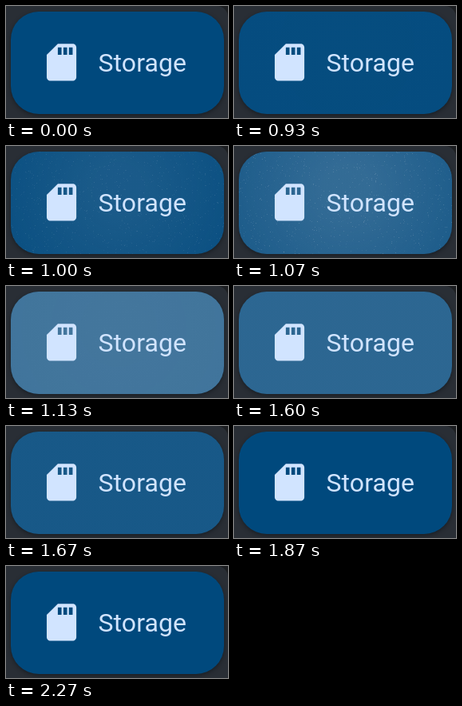
Recreate the animation shown at these times as an HTML page with a canvas. Size 278 by 140 pixels, loop 2.39 s.

```html
<!DOCTYPE html>
<html lang="en">
<head>
<meta charset="utf-8">
<title>Storage button</title>
<style>
  html, body { margin: 0; width: 100%; height: 100%; overflow: hidden; background: #1c1e21; }
  .panel { position: absolute; inset: 0; background: #292e35; border-top-right-radius: 14px; }
  .card {
    position: absolute; left: 6px; top: 7px; width: 266.5px; height: 127.6px;
    border-radius: 35px; overflow: hidden; background: #00497d;
    box-shadow: 0 2px 5px rgba(12, 15, 20, .5);
  }
  canvas { display: block; }
  svg { position: absolute; left: 0; top: 0; fill: #d1e4ff; }
  text { font: 400 32px Roboto, sans-serif; letter-spacing: .1px; }
</style>
</head>
<body>
<div class="panel"></div>
<div class="card"><canvas width="267" height="128"></canvas></div>
<svg width="278" height="140" viewBox="0 0 278 140">
  <path transform="translate(41.7 42.5) scale(2.32)" fill-rule="evenodd"
    d="M18 2h-8L4 8v12c0 1.1.9 2 2 2h12c1.1 0 2-.9 2-2V4c0-1.1-.9-2-2-2zM12 8h-2V4h2zM15 8h-2V4h2zM18 8h-2V4h2z"/>
  <text x="115.5" y="81.8">Storage</text>
</svg>
<script>
  const LOOP = 2390, FRAME = 1000 / 15, PEAK = .325;
  const canvas = document.querySelector('canvas');
  const ctx = canvas.getContext('2d');
  const { width: W, height: H } = canvas;
  const tint = a => `rgba(209,215,225,${a})`;

  function smooth(x) {
    x = Math.min(1, Math.max(0, x));
    return x * x * (3 - 2 * x);
  }

  function seeded(seed) {
    return () => (seed = (seed * 16807) % 2147483647) / 2147483647;
  }

  function sparkle(strength, seed) {
    const rnd = seeded(seed);
    for (let i = 0; i < 1500; i++) {
      const x = Math.floor(rnd() * W), y = Math.floor(rnd() * H);
      ctx.fillStyle = tint(strength * .2 * rnd() ** 2);
      ctx.fillRect(x, y, 1, 1);
    }
  }

  function draw(n) {
    const rise = smooth((n - 13.3) / 4);
    const fall = smooth((n - 22) / 5);
    const spread = 4 * rise * rise * (1 - rise);   // ripple front crossing the card
    const level = PEAK * (rise - fall);

    ctx.clearRect(0, 0, W, H);
    const glow = ctx.createRadialGradient(135, 46, 30, 135, 46, 140);
    glow.addColorStop(0, tint(level));
    glow.addColorStop(1, tint(level - .18 * spread));
    ctx.fillStyle = glow;
    ctx.fillRect(0, 0, W, H);
    if (spread > 0) sparkle(1.8 * spread, 7919 * n);
  }

  let shown = -1;
  function tick() {
    const t = performance.now() % LOOP;
    const n = Math.floor((t + 4) / FRAME);   // the picture steps at 15 fps
    if (n !== shown) draw(shown = n);
    requestAnimationFrame(tick);
  }
  tick();
</script>
</body>
</html>
```
